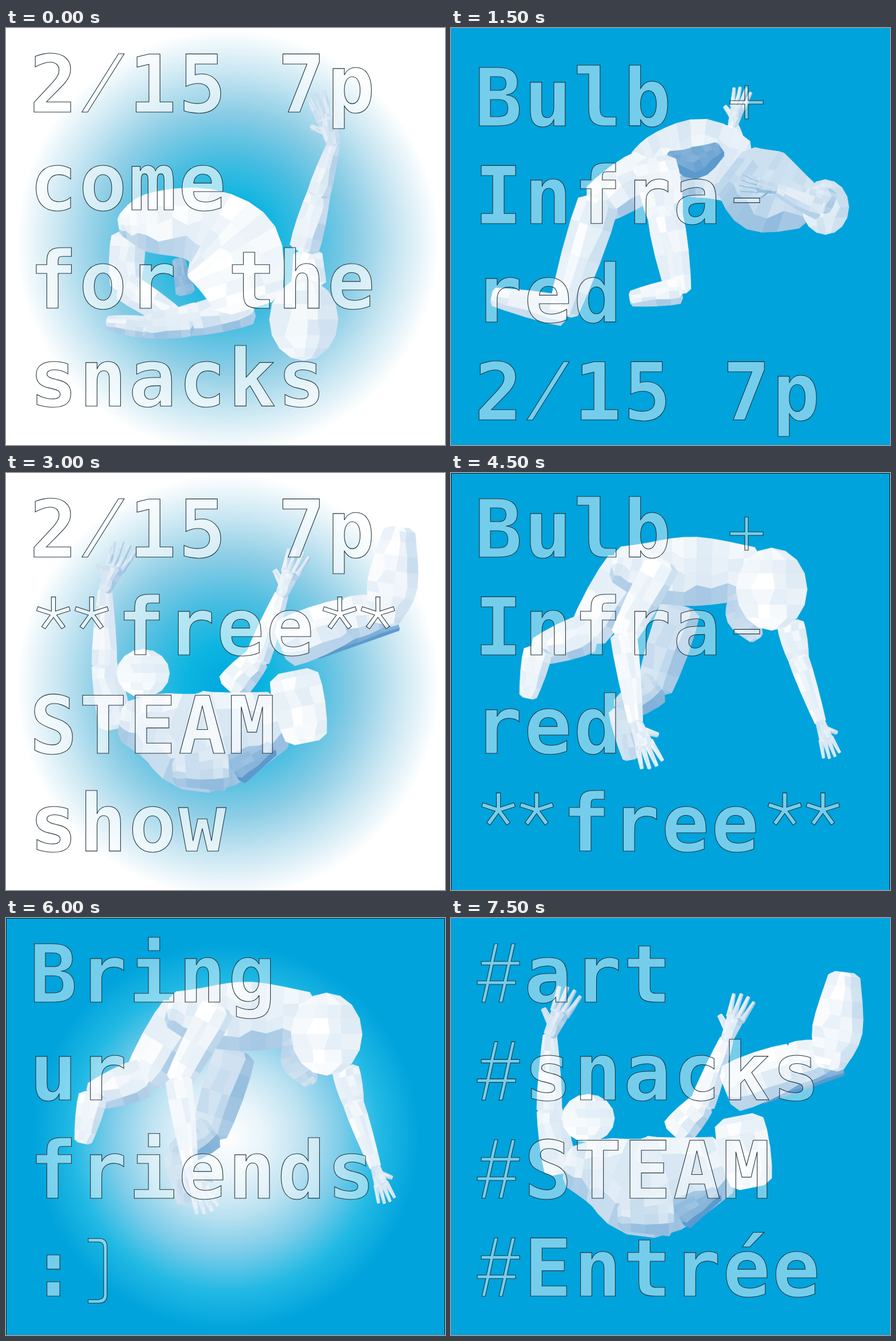
Animation, 768 px wide and 729 px high, one loop 8 s. Source, as an HTML page:

```html
<!DOCTYPE html>
<html lang="en">
<head>
<meta charset="utf-8">
<title>Poster loop</title>
<style>
  html, body { margin: 0; width: 100%; height: 100%; overflow: hidden; background: #fff; }
  svg { display: block; width: 768px; height: 729px; }
  .scene { opacity: 0; animation: show 8s step-end infinite; }
  .scene:last-child { animation-name: tail; }
  @keyframes show { 0% { opacity: 1 } 18.75%, 100% { opacity: 0 } }
  @keyframes tail { 0% { opacity: 1 } 6.25%, 100% { opacity: 0 } }
  .copy { stroke: #24363d; stroke-width: 1.1; fill: #fff; }
  .body { stroke-width: .8; stroke-linejoin: round; }
  text { font: bold 138.5px "DejaVu Sans Mono", monospace; letter-spacing: 3.4px; }
</style>
</head>
<body>
<svg id="stage" viewBox="0 0 768 729" xmlns="http://www.w3.org/2000/svg"></svg>
<script>
const BLUE = '#00a3dc';

const glow = (id, cx, cy, r, colors) =>
  `<radialGradient id="${id}" gradientUnits="userSpaceOnUse" cx="${cx}" cy="${cy}" r="${r}">` +
  colors.map((c, i) => `<stop offset="${i / (colors.length - 1)}" stop-color="${c}"/>`).join('') +
  '</radialGradient>';

const defs = '<defs>' +
  glow('blueGlow', 388, 373, 370, ['#00a6de', '#0cb5e1', '#48bde1', '#88cce5', '#c8e6f2', '#fff']) +
  glow('whiteGlow', 385, 383, 338, ['#fff', '#e8f4fa', '#bde2f1', '#7bcce9', '#22b9e4', BLUE]) +
  '</defs>';

let seed = 1;
const noise = () => (seed = seed * 16807 % 2147483647) / 2147483647 - .5;

// 0 is lit, 1 is full shadow
const tone = s => {
  const k = Math.min(1, Math.max(0, s));
  return `rgb(${[92, 154, 205].map(c => Math.round(255 + (c - 255) * k))})`;
};

const toward = ([x, y], angle, dist) => [x + Math.cos(angle) * dist, y + Math.sin(angle) * dist];
const heading = (a, b) => Math.atan2(b[1] - a[1], b[0] - a[0]);

// Low-poly skin over rings [x, y, radius], lit from the upper left
function skin(shade, rings) {
  const lanes = [-1, -.5, 0, .5, 1];
  const rows = rings.map((p, i) => {
    const side = heading(rings[i - 1] || p, rings[i + 1] || p) + Math.PI / 2;
    const dots = lanes.map(u => toward(p, side, p[2] * (u + (Math.abs(u) < 1 ? noise() * .3 : 0))));
    return { side, dots };
  });
  let faces = '';
  for (let i = 1; i < rows.length; i++) {
    const [a, b] = [rows[i - 1], rows[i]];
    const away = Math.cos(b.side - 1.1);
    for (let j = 1; j < lanes.length; j++) {
      const turn = Math.max(0, (lanes[j] + lanes[j - 1]) / 2 * away);
      const color = tone(shade + .65 * turn ** 1.5 + .06 + noise() * .16);
      const pts = [a.dots[j - 1], a.dots[j], b.dots[j], b.dots[j - 1]].map(d => d.map(n => n.toFixed(1)));
      faces += `<polygon fill="${color}" stroke="${color}" points="${pts.join(' ')}"/>`;
    }
  }
  return faces;
}

const cap = (end, next) => [...toward(end, heading(next, end), end[2] * .25), end[2] * .6];

// Catmull-Rom tube through key rings, swelling in the middle by bulge
function tube(shade, keys, bulge = 0) {
  const rings = [], steps = 4, last = keys.length - 1;
  for (let n = 0; n <= last * steps; n++) {
    const i = Math.min(last - 1, Math.floor(n / steps)), t = n / steps - i;
    const [b, c] = [keys[i], keys[i + 1]], a = keys[i - 1] || b, d = keys[i + 2] || c;
    const ring = b.map((v, k) => v + t / 2 * (c[k] - a[k] +
      t * (2 * a[k] - 5 * v + 4 * c[k] - d[k] + t * (3 * (v - c[k]) + d[k] - a[k]))));
    ring[2] *= 1 + bulge * Math.sin(Math.PI * n / last / steps);
    rings.push(ring);
  }
  return skin(shade, [cap(rings[0], rings[1]), ...rings, cap(rings.at(-1), rings.at(-2))]);
}

const ball = (shade, x, y, rx, ry) => skin(shade, Array.from({ length: 9 }, (_, i) => {
  const a = Math.PI * i / 8;
  return [x, y - ry * Math.cos(a), rx * Math.sin(a) + .1];
}));

const limb = (shade, radii, joints, bulge) => joints.slice(1).map((end, i) =>
  tube(shade, [[...joints[i], radii[i]], [...end, radii[i + 1]]], bulge)).join('');

function hand(shade, wrist, tip) {
  const a = heading(wrist, tip), size = Math.hypot(tip[0] - wrist[0], tip[1] - wrist[1]);
  const digit = (root, angle, len, r) =>
    limb(shade, [r * size, r * size * .6], [root, toward(root, angle, len * size)], 0);
  const knuckle = toward(wrist, a, size * .45);
  const fingers = [-1.5, -.5, .5, 1.5].map(k =>
    digit(toward(knuckle, a + Math.PI / 2, k * size * .09), a + k * .12, .53 - Math.abs(k) * .05, .055));
  return digit(toward(wrist, a, size * .15), a - .9, .4, .08) + fingers.join('') +
    limb(shade, [size * .12, size * .17], [wrist, knuckle], 0);
}

const arm = (shade, size, shoulder, elbow, wrist, tip) =>
  limb(shade, [26, 20, 11].map(r => r * size), [shoulder, elbow, wrist], .1) + hand(shade + .1, wrist, tip);

const leg = (shade, size, ...joints) => limb(shade, [42, 36, 26, 16].map(r => r * size), joints, .12);

// Each pose lists its parts from back to front by their joints
const poses = {
  crouch: () => [
    tube(.6, [[302, 405, 11], [314, 462, 17]]),
    leg(.05, .7, [214, 365], [208, 452], [300, 510], [335, 490]),
    leg(.1, .72, [425, 488], [320, 513], [240, 523], [178, 515]),
    tube(0, [[202, 345, 20], [245, 341, 50], [340, 345, 66], [395, 392, 88], [425, 475, 62]]),
    tube(0, [[528, 395, 25], [530, 445, 30]]),
    arm(.1, 1, [522, 385], [547, 290], [573, 203], [548, 108]),
    ball(.06, 521, 510, 60, 71)
  ],
  arch: () => [
    arm(0, .9, [500, 230], [495, 200], [493, 170], [512, 102]),
    tube(.1, [[335, 255, 42], [375, 238, 58], [440, 228, 69], [500, 250, 57]]),
    tube(.28, [[500, 250, 52], [550, 285, 74], [622, 310, 42]]),
    tube(.75, [[380, 223, 8], [425, 236, 28], [470, 212, 14]]),
    leg(.03, 1, [345, 252], [257, 308], [197, 495], [75, 470]),
    leg(.03, .85, [358, 235], [375, 330], [398, 460], [316, 473]),
    ball(.15, 655, 313, 41, 48),
    arm(.18, .9, [652, 285], [645, 318], [568, 282], [503, 268])
  ],
  fall: () => [
    tube(.7, [[545, 312, 13], [685, 268, 8]]),
    arm(.08, 1.1, [192, 440], [172, 335], [173, 205], [212, 120]),
    arm(0, 1.1, [395, 375], [440, 325], [482, 213], [516, 132]),
    leg(0, 1, [490, 298], [600, 254], [660, 240]),
    tube(.02, [[688, 102, 28], [676, 195, 44], [662, 258, 26]]),
    ball(0, 240, 350, 46, 42),
    tube(.1, [[208, 435, 36], [265, 445, 62], [350, 470, 89], [475, 432, 52]]),
    tube(.6, [[405, 522, 24], [465, 482, 14]]),
    tube(.2, [[298, 522, 25], [380, 518, 38]]),
    leg(.02, 1.02, [504, 357], [525, 462])
  ],
  crawl: () => [
    leg(.25, .85, [400, 240], [357, 375], [298, 415], [314, 498]),
    leg(.03, .95, [310, 165], [240, 280], [152, 312], [135, 390]),
    tube(.06, [[290, 160, 32], [350, 172, 52], [430, 172, 60], [530, 175, 45]]),
    arm(.05, .9, [594, 265], [608, 325], [646, 435], [668, 500]),
    arm(0, 1.15, [370, 160], [302, 285], [323, 435], [355, 518]),
    tube(.3, [[505, 215, 20], [512, 250, 30], [534, 288, 13]]),
    ball(0, 561, 203, 62, 72)
  ]
};

const figure = name => {
  seed = 77;
  return poses[name]().join('');
};

const star = () => {
  const at = (r, deg) => {
    const [x, y] = toward([0, -72], deg * Math.PI / 180, r);
    return `${x.toFixed(1)} ${y.toFixed(1)}`;
  };
  return 'M' + [0, 1, 2, 3, 4].map(k => {
    const a = 72 * k - 90;
    return [at(30, a - 7), at(30, a + 7), at(6, a + 36)].join('L');
  }).join('L') + 'z';
};

// Light symbols, centred on their cell with the baseline at zero
const symbols = {
  '+': 'M-3-70h6v26h26v6h-26v26h-6v-26h-26v-6h26z',
  '-': 'M-22-45h45v8h-45z',
  '/': 'M-37 0L27-102h10L-27 0z',
  ')': 'M-26-101h19q14 0 14 14v85q0 14-14 14h-19v-6h17q10 0 10-9v-83q0-9-10-9h-17z',
  '#': 'M-7-102h6l-7 31h24l7-31h6l-7 31h15v6h-16l-6 28h15v6h-16l-7 31h-6l7-31h-24l-7 31h-6' +
    'l7-31h-15v-6h16l6-28h-15v-6h16zM-9-65l-6 28h24l6-28z',
  '*': star()
};

function line(str, y) {
  return [...str.matchAll(/[^\s*+\-\/)#]+|\S/g)].map(({ 0: part, index }) => {
    const pairs = str.slice(0, index + 1).split('**').length - 1;
    const x = 83 + 86.8 * index - 20 * pairs;
    return symbols[part]
      ? `<path transform="translate(${x} ${y})" d="${symbols[part]}"/>`
      : `<text x="${x - 41.7}" y="${y}">${part}</text>`;
  }).join('');
}

const scenes = [
  { fill: 'url(#blueGlow)', pose: 'crouch', alpha: .62, lines: ['2/15 7p', 'come', 'for the', 'snacks'] },
  { fill: BLUE, pose: 'arch', top: 171, lines: ['Bulb +', 'Infra-', 'red', '2/15 7p'] },
  { fill: 'url(#blueGlow)', pose: 'fall', alpha: .62, lines: ['2/15 7p', '**free**', 'STEAM', 'show'] },
  { fill: BLUE, pose: 'crawl', frame: true, lines: ['Bulb +', 'Infra-', 'red', '**free**'] },
  { fill: 'url(#whiteGlow)', pose: 'crawl', frame: true, lines: ['Bring', 'ur', 'friends', ':)'] },
  { fill: BLUE, pose: 'fall', lines: ['#art', '#snacks', '#STEAM', '#Entrée'] }
];

document.getElementById('stage').innerHTML = defs + scenes.map((s, i) =>
  `<g class="scene" style="animation-delay:${1.5 * i - 8}s">
    <rect width="768" height="729" fill="${s.fill}"/>
    <g class="body">${figure(s.pose)}</g>
    <g class="copy" fill-opacity="${s.alpha || .46}">
      ${s.lines.map((str, n) => line(str, (s.top || 147) + 171.4 * n)).join('')}
    </g>
    ${s.frame ? '<path d="M.5 729V.5H767.5V729" fill="none" stroke="#06222e"/>' : ''}
  </g>`).join('');
</script>
</body>
</html>
```
